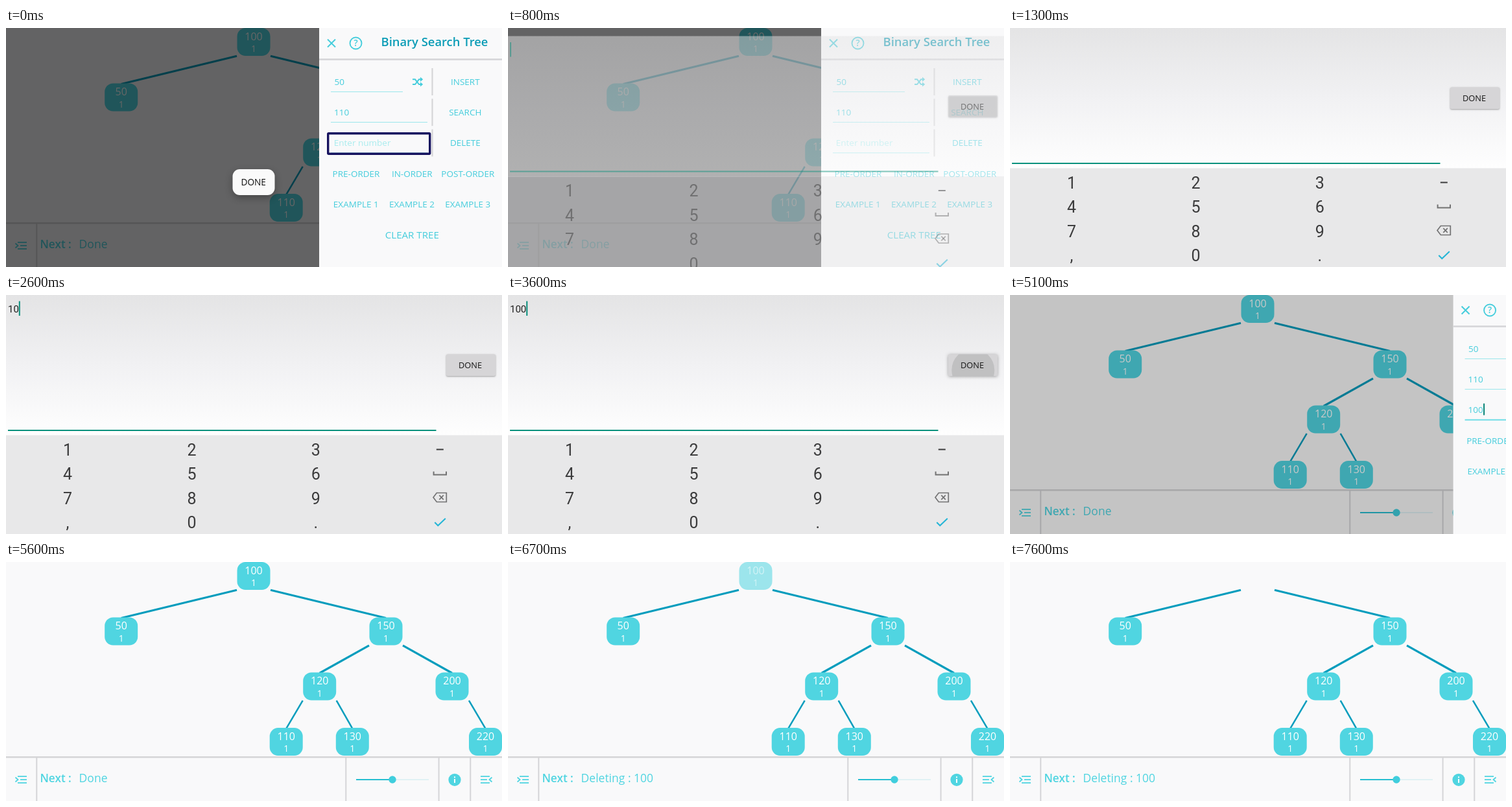
Recreate the animation shown at these times as an HTML page with a canvas. Size 765 px wide and 369 px high, loop 8 s.

```html
<!DOCTYPE html>
<html lang="en">
<head>
<meta charset="utf-8">
<title>Binary Search Tree</title>
<style>
  html, body { margin: 0; width: 100%; height: 100%; overflow: hidden; background: #f9f9fa; }
  canvas { display: block; width: 765px; height: 369px; }
</style>
</head>
<body>
<canvas id="stage"></canvas>
<script>
const W = 765, H = 369, LOOP = 8000, STEP = 100;
const CYAN = '#50d5e1', TEXT = '#45cddc', DEEP = '#079dbd', PAPER = '#f9f9fa', RULE = '#d5d5d7';
const SANS = '"Open Sans", "Noto Sans", sans-serif';
const KEYS = 'Roboto, "Open Sans", sans-serif';

const canvas = document.getElementById('stage');
const ctx = canvas.getContext('2d');
const dpr = window.devicePixelRatio || 1;
canvas.width = W * dpr;
canvas.height = H * dpr;

const clamp = v => Math.max(0, Math.min(1, v));
const ramp = (t, start, length) => clamp((t - start) / length);
const between = (t, a, b) => t >= a && t < b;

function line(color, width, ...points) {
  ctx.strokeStyle = color;
  ctx.lineWidth = width;
  ctx.beginPath();
  points.forEach(([x, y]) => ctx.lineTo(x, y));
  ctx.stroke();
}

function box(color, x, y, w, h, r = 0) {
  ctx.fillStyle = color;
  ctx.beginPath();
  ctx.roundRect(x, y, w, h, r);
  ctx.fill();
}

function disc(color, x, y, r) {
  ctx.fillStyle = color;
  ctx.beginPath();
  ctx.arc(x, y, r, 0, Math.PI * 2);
  ctx.fill();
}

function text(str, x, y, size, color, align = 'center', weight = 400, family = SANS) {
  ctx.font = `${weight} ${size}px ${family}`;
  ctx.textAlign = align;
  ctx.fillStyle = color;
  ctx.fillText(str, x, y);
}

function shadowed(color, blur, dy, draw) {
  ctx.save();
  ctx.shadowColor = color;
  ctx.shadowBlur = blur * dpr;
  ctx.shadowOffsetY = dy * dpr;
  draw();
  ctx.restore();
}

// --- tree and bottom bar ---

const tree = {
  key: 100, x: 382, y: 21.5, kids: [
    { key: 50, x: 177.7, y: 107, kids: [] },
    { key: 150, x: 586, y: 107, kids: [
      { key: 120, x: 483.7, y: 192, kids: [
        { key: 110, x: 432.2, y: 277.6, kids: [] },
        { key: 130, x: 534.3, y: 277.6, kids: [] }
      ] },
      { key: 200, x: 688, y: 192, kids: [
        { key: 220, x: 739.5, y: 277.6, kids: [] }
      ] }
    ] }
  ]
};

function drawEdges(node) {
  for (const kid of node.kids) {
    const side = Math.sign(kid.x - node.x);
    const steep = Math.abs(kid.x - node.x) < 60;
    line(DEEP, steep ? 2.5 : 3.2, [node.x + side * 26, node.y + 21.8], [kid.x, kid.y - 20.5]);
    drawEdges(kid);
  }
}

function drawNode(node, rootAlpha) {
  ctx.save();
  if (node === tree) ctx.globalAlpha *= rootAlpha;
  box(CYAN, node.x - 25.5, node.y - 21.5, 51, 43, 13);
  text(node.key, node.x, node.y - 3, 16, '#fff');
  text('1', node.x, node.y + 15.8, 14, '#fff');
  ctx.restore();
  node.kids.forEach(kid => drawNode(kid, rootAlpha));
}

function menuIcon(x, dir) {
  for (const [dy, inset] of [[-5, 4], [0, 8], [5, 4]]) {
    line(CYAN, 1.8, [x - dir * (9 - inset), 336 + dy], [x + dir * 9, 336 + dy]);
  }
  line(CYAN, 1.8, [x - dir * 8.5, 332.5], [x - dir * 4.5, 336], [x - dir * 8.5, 339.5]);
}

function drawApp(t) {
  box(PAPER, 0, 0, W, H);
  drawEdges(tree);
  drawNode(tree, 1 - ramp(t, 6200, 1100));

  line(RULE, 2.4, [0, 301.2], [W, 301.2]);
  for (const x of [47.3, 524.3, 667.6, 716.3]) line(RULE, 2, [x, 302], [x, H]);
  menuIcon(23, 1);
  menuIcon(741, -1);

  text('Next :', 52.4, 340.3, 17.2, CYAN, 'left', 600);
  text(t < 6300 ? 'Done' : 'Deleting : 100', 112.6, 340.3, 17.5, CYAN, 'left');

  line('#e0f1f4', 2, [596, 336], [652, 336]);
  line('#27bed1', 2, [540, 336], [596, 336]);
  disc('#40cedd', 596, 336, 5.7);
  disc(CYAN, 692, 336.3, 9.6);
  box('#fff', 691, 335, 2, 6);
  box('#fff', 691, 331.3, 2, 2);
}

// --- side panel ---

function shuffleIcon() {
  line(TEXT, 1.9, [627, 79.3], [631, 79.3], [637, 87], [640, 87]);
  line(TEXT, 1.9, [627, 87], [631, 87], [637, 79.3], [640, 79.3]);
  for (const y of [79.3, 87]) {
    ctx.fillStyle = TEXT;
    ctx.beginPath();
    ctx.moveTo(639, y - 3.6);
    ctx.lineTo(643.2, y);
    ctx.lineTo(639, y + 3.6);
    ctx.fill();
  }
}

function frame(x, y, w, h) {
  ctx.strokeStyle = '#17135f';
  ctx.lineWidth = 3.4;
  ctx.beginPath();
  ctx.roundRect(x, y, w, h, 1);
  ctx.stroke();
}

function drawPanel(t, open) {
  const filled = t >= 3600;
  ctx.save();
  ctx.translate(282 * (1 - open), 0);
  box('#f9f9fa', 483, 0, 282, H);

  line(TEXT, 2, [496, 17.5], [508, 29.5]);
  line(TEXT, 2, [508, 17.5], [496, 29.5]);
  ctx.strokeStyle = TEXT;
  ctx.lineWidth = 1.9;
  ctx.beginPath();
  ctx.arc(539.5, 23.5, 9, 0, Math.PI * 2);
  ctx.stroke();
  text('?', 539.5, 28.3, 13.5, TEXT, 'center', 600);
  text('Binary Search Tree', 578.5, 28, 18.4, '#0b9cb6', 'left', 600);
  line(RULE, 2.6, [483, 48.5], [W, 48.5]);

  text('50', 506.5, 87.9, 13.5, TEXT, 'left');
  text('110', 506, 134.9, 13.5, TEXT, 'left');
  if (filled) text('100', 506, 181.9, 13.5, TEXT, 'left');
  else text('Enter number', 505.8, 181.9, 13.5, '#a8ecee', 'left');
  line('#9ae6ec', 1, [501, 98.5], [612, 98.5]);
  line('#9ae6ec', 1, [501, 145.5], [650, 145.5]);
  line(filled ? '#6fdde6' : '#9ae6ec', filled ? 2 : 1, [501, 192.8], [650, 192.8]);
  if (t >= 5000) box('#078375', 529.5, 167.5, 2, 18);
  shuffleIcon();

  ['INSERT', 'SEARCH', 'DELETE'].forEach((label, i) => {
    const y = 83 + i * 47.2;
    line(RULE, 2.2, [657.5, y - 21], [657.5, y + 21]);
    text(label, 708.3, y + 4.9, 13.5, TEXT);
  });
  [['PRE-ORDER', 540], ['IN-ORDER', 626.3], ['POST-ORDER', 712.3]].forEach(([s, x]) => text(s, x, 229.7, 13.5, TEXT));
  [1, 2, 3].forEach(n => text('EXAMPLE ' + n, 453.6 + n * 86.2, 276.7, 13.5, TEXT));
  text('CLEAR TREE', 626.3, 324.7, 15.1, TEXT);

  if (t < 600) frame(496.7, 162.7, 157, 31.5);
  if (between(t, 4500, 4900)) frame(665.6, 161, 83, 33);
  ctx.restore();
}

function drawToast(alpha) {
  if (alpha <= 0) return;
  ctx.save();
  ctx.globalAlpha = alpha;
  shadowed('rgba(0,0,0,.3)', 12, 4, () => box('#fafafa', 349.5, 218, 65, 40, 11));
  text('DONE', 381.7, 243, 13.6, '#111');
  ctx.restore();
}

// --- full screen number entry ---

const COLS = [95, 286.5, 477.7, 669.3], ROWS = [238.5, 276, 313.6, 351.2];
const PRESSES = [[2000, 0, 0], [2500, 1, 3], [3000, 1, 3]];

function caretOn(t) {
  if (t < 2000) return t >= 1700 || between(t, 700, 1200);
  const typed = [3100, 2600, 2000].find(v => t >= v);
  return t - typed < 600;
}

function drawKeys(t) {
  box('#e8e8e9', 0, 216.5, W, 153);
  for (const [at, col, row] of PRESSES) {
    if (between(t, at, at + 100)) box('#d3d3d5', col * 191.25, 217 + row * 38, 191.25, 38);
  }
  ['123', '456', '789', ',0.'].forEach((keys, r) => {
    [...keys].forEach((k, c) => text(k, COLS[c], ROWS[r] + 9, 25, '#3b3b3c', 'center', 400, KEYS));
  });

  const x = COLS[3], grey = '#727273';
  line('#3b3b3c', 2, [x - 5.5, 238.5], [x + 5.5, 238.5]);
  line(grey, 2, [x - 9.7, 272.5], [x - 9.7, 277.5], [x + 9.7, 277.5], [x + 9.7, 272.5]);
  ctx.beginPath();
  [[-10.3, 0], [-5, -7], [10, -7], [10, 7], [-5, 7]].forEach(([dx, dy]) => ctx.lineTo(x + dx, 312.5 + dy));
  ctx.closePath();
  ctx.strokeStyle = grey;
  ctx.lineWidth = 1.7;
  ctx.stroke();
  line(grey, 1.7, [x - 1, 309.2], [x + 5.5, 315.8]);
  line(grey, 1.7, [x + 5.5, 309.2], [x - 1, 315.8]);
  line('#25b5d6', 2.1, [x - 8, 351], [x - 3, 356], [x + 8.5, 345]);
}

function drawDoneButton(t) {
  const pressed = between(t, 3500, 3900);
  shadowed('rgba(0,0,0,.35)', pressed ? 5 : 2.5, 1, () => box('#d6d5d7', 679, 91.5, 76, 33.5, 2));
  if (pressed) {
    ctx.save();
    ctx.beginPath();
    ctx.roundRect(679, 91.5, 76, 33.5, 2);
    ctx.clip();
    disc('#c0c0c1', 717.3, 116, 17 + (t - 3500) * 0.16);
    ctx.restore();
  }
  text('DONE', 716, 113, 12.8, '#161616');
}

function drawEntry(t) {
  const sky = ctx.createLinearGradient(0, 0, 0, 216);
  [[0, '#e4e4e5'], [0.5, '#f1f1f3'], [1, '#fefefe']].forEach(s => sky.addColorStop(...s));
  box(sky, 0, 0, W, 217);

  const typed = '100'.slice(0, [2000, 2600, 3100].filter(v => t >= v).length);
  text(typed, 3, 27, 15, '#222', 'left', 400, KEYS);
  if (caretOn(t)) box('#0a8f7c', 3 + typed.length * 8.4, 9.5, 2, 22.5);
  box('#0a917d', 3, 208, 660.5, 2);
  drawDoneButton(t);
  drawKeys(t);
}

// --- timeline ---

function render(t) {
  ctx.setTransform(dpr, 0, 0, dpr, 0, 0);
  ctx.globalAlpha = 1;

  const shown = ramp(t, 600, 400) * (1 - ramp(t, 3700, 400));
  if (shown < 1) {
    const open = Math.pow(1 - ramp(t, 5012, 400), 5);
    drawApp(t);
    if (open > 0.001) {
      box(`rgba(0,0,0,${0.6 * Math.pow(open, 0.83)})`, 0, 0, W, H);
      drawPanel(t, open);
    }
    drawToast(1 - ramp(t, 0, 400));
  }
  if (shown > 0) {
    ctx.save();
    ctx.globalAlpha = shown;
    ctx.translate(0, 50 * Math.pow(1 - shown, 2));
    drawEntry(t);
    ctx.restore();
  }
}

const began = performance.now();
function tick() {
  const t = (performance.now() - began) % LOOP;
  render(Math.floor(t / STEP) * STEP);
  requestAnimationFrame(tick);
}
tick();
</script>
</body>
</html>
```
